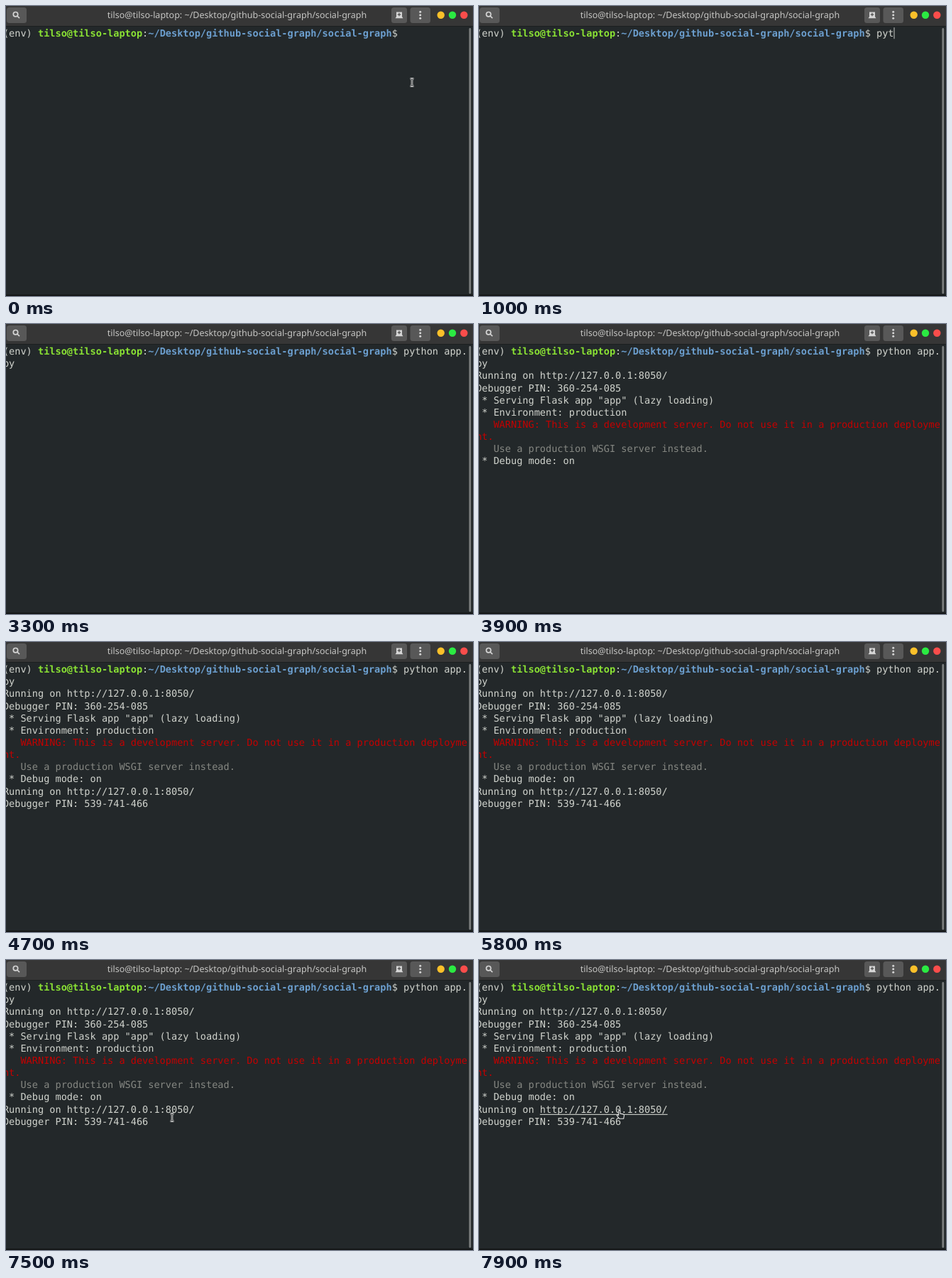
Animation of 658 by 408 pixels, one loop 8000 ms. Source, as an HTML page:

```html
<!DOCTYPE html>
<html lang="en">
<head>
<meta charset="utf-8">
<title>Terminal</title>
<style>
  html, body { margin: 0; width: 100%; height: 100%; overflow: hidden; background: #23282a; }
  svg { display: block; width: 658px; height: 408px; }
  text { white-space: pre; text-rendering: geometricPrecision; }
  #screen { font: 13.58px "DejaVu Sans Mono", monospace; fill: #d0d3cd; }
  #title { font: 12.52px "Noto Sans", sans-serif; fill: #c6c6c4; }
  .user { fill: #8ae234; font-weight: bold; }
  .path { fill: #6c9fcf; font-weight: bold; }
  .warn { fill: #c40000; }
  .dim { fill: #858782; }
  .button { fill: #585858; }
  .icon { fill: #d6d6d6; }
  .halo { fill: none; stroke: #e4e4e4; stroke-width: 2.6; }
  .core { fill: none; stroke: #16191a; stroke-width: .9; }
</style>
</head>
<body>
<svg viewBox="0 0 658 408">
  <rect width="658" height="408" fill="#23282a"/>
  <rect width="658" height="28" fill="#363636"/>
  <rect y="28" width="658" height="1" fill="#1c1f20"/>
  <rect y="406" width="658" height="2" fill="#141718"/>
  <rect x="652.4" y="31" width="2.8" height="374" rx="1.4" fill="#7b7e7e"/>

  <rect class="button" x="1" y="2" width="28" height="22" rx="3.5"/>
  <rect class="button" x="543" y="2" width="22" height="22" rx="3.5"/>
  <rect class="button" x="569.5" y="2" width="28.5" height="22" rx="3.5"/>
  <g fill="none" stroke="#d6d6d6" stroke-width="1.7">
    <circle cx="13.5" cy="11.7" r="3.2"/>
    <path d="M15.8 14L19 17.2"/>
  </g>
  <path class="icon" d="M550 8.5h8v6.5l1.5 2.2h-11l1.5-2.2z"/>
  <path d="M554 9.8v4.4M551.8 12h4.4" stroke="#585858" stroke-width="1.3"/>
  <g class="icon">
    <circle cx="583.7" cy="8.3" r="1.5"/>
    <circle cx="583.7" cy="12.8" r="1.5"/>
    <circle cx="583.7" cy="17.3" r="1.5"/>
  </g>
  <circle cx="612.7" cy="12.7" r="5.2" fill="#fbc02a"/>
  <circle cx="629" cy="12.7" r="5.2" fill="#2bea42"/>
  <circle cx="645.3" cy="12.7" r="5.2" fill="#fa4d4b"/>
  <text id="title" x="325.5" y="17" text-anchor="middle"></text>

  <g id="screen"></g>
  <rect id="underline" y="216.8" height="1.1" fill="#d0d3cd"/>
  <rect id="caret" y=".5" width="1" height="16" fill="#c4c6c2"/>

  <g id="beam">
    <path class="halo" d="M-2.5-5.2h1.5l1 1 1-1h1.5M0-4.5V4.5M-2.5 5.2h1.5l1-1 1 1h1.5"/>
    <path class="core" d="M-2.5-5.2h1.5l1 1 1-1h1.5M0-4.5V4.5M-2.5 5.2h1.5l1-1 1 1h1.5"/>
  </g>
  <path id="hand" fill="#23282a" stroke="#e4e4e4" stroke-width="1.1" stroke-linejoin="round"
    d="M-2.8-4.4q1.2-1.4 2.2 0v4l4.2.8q1.6.4 1.4 2l-.8 4.4h-6l-3.4-4.6q-.2-1.4 1.2-1.2l1.2 1z"/>
</svg>
<script>
const LOOP = 8000, TICK = 100;
const LEFT = -4.1, TOP = 29.7, BASELINE = 43.2, CELL = 8.175, LINE = 17.13, COLUMNS = 80;
const USER = "tilso@tilso-laptop", PATH = "~/Desktop/github-social-graph/social-graph";
const PROMPT_END = `(env) ${USER}:${PATH}$ `.length;
const URL_TEXT = "http://127.0.0.1:8050/", URL_COLUMN = 11, URL_ROW = 10;

const byId = id => document.getElementById(id);
const columnX = column => LEFT + column * CELL;
const span = (style, text) => `<tspan class="${style}">${text}</tspan>`;

// Time at which each prefix of the command is visible
const typing = [
  [0, ""], [400, "p"], [500, "py"], [1000, "pyt"], [1300, "pyth"], [1500, "pytho"],
  [1700, "python"], [1800, "python "], [2100, "python a"], [2300, "python ap"],
  [2500, "python app.py "]
];

const startup = [
  `Running on ${URL_TEXT}`,
  "Debugger PIN: 360-254-085",
  ' * Serving Flask app "app" (lazy loading)',
  " * Environment: production",
  span("warn", "   WARNING: This is a development server. Do not use it in a production deployme"),
  span("warn", "nt."),
  span("dim", "   Use a production WSGI server instead."),
  " * Debug mode: on"
];
const reload = [`Running on ${URL_TEXT}`, "Debugger PIN: 539-741-466"];

// Pointer tracks: [time, x, y]
const firstMove = [[0, 572, 107.5], [100, 572, 104], [300, 567, 44]];
const secondMove = [[7000, 567, 44], [7200, 425, 135], [7400, 262, 226], [7600, 206, 217], [7800, 199.5, 216.5]];

function along(track, time) {
  const next = track.findIndex(point => point[0] > time);
  if (next < 0) return track.at(-1).slice(1);
  const [t0, x0, y0] = track[next - 1], [t1, x1, y1] = track[next];
  const k = (time - t0) / (t1 - t0);
  return [x0 + (x1 - x0) * k, y0 + (y1 - y0) * k];
}

function place(element, visible, x, y) {
  element.style.display = visible ? "" : "none";
  if (visible) element.setAttribute("transform", `translate(${x} ${y})`);
}

function drawScreen(time, command) {
  const split = COLUMNS - PROMPT_END;
  const lines = [
    `(env) ${span("user", USER)}:${span("path", PATH)}$ ${command.slice(0, split)}`,
    command.slice(split)
  ];
  if (time >= 3900) lines.push(...startup);
  if (time >= 4300) lines.push(...reload);
  byId("screen").innerHTML = lines.map((line, row) =>
    `<text x="${LEFT}" y="${BASELINE + row * LINE}">${line}</text>`).join("");
}

function drawPointer(time) {
  const typed = time >= 400, shown = !typed || time >= 7000;
  const [x, y] = typed ? along(secondMove, Math.max(time, 7000)) : along(firstMove, time);
  const urlStart = columnX(URL_COLUMN), urlWidth = URL_TEXT.length * CELL;
  const urlTop = TOP + URL_ROW * LINE;
  const hover = shown && x > urlStart && x < urlStart + urlWidth && y > urlTop && y < urlTop + LINE;
  place(byId("beam"), shown && !hover, x, y);
  place(byId("hand"), hover, x, y);
  place(byId("underline"), hover, urlStart, 0);
  byId("underline").setAttribute("width", urlWidth);
}

function draw(time) {
  const command = typing.findLast(step => step[0] <= time)[1];
  const cell = PROMPT_END + command.length;
  drawScreen(time, command);
  place(byId("caret"), time >= 400 && time < 3100,
    columnX(cell % COLUMNS), TOP + Math.floor(cell / COLUMNS) * LINE);
  drawPointer(time);
}

byId("title").textContent = `${USER}: ${PATH}`;
let lastTime = -1;
function frame() {
  const time = Math.floor(performance.now() % LOOP / TICK) * TICK;
  if (time !== lastTime) draw(lastTime = time);
  requestAnimationFrame(frame);
}
frame();
</script>
</body>
</html>
```
